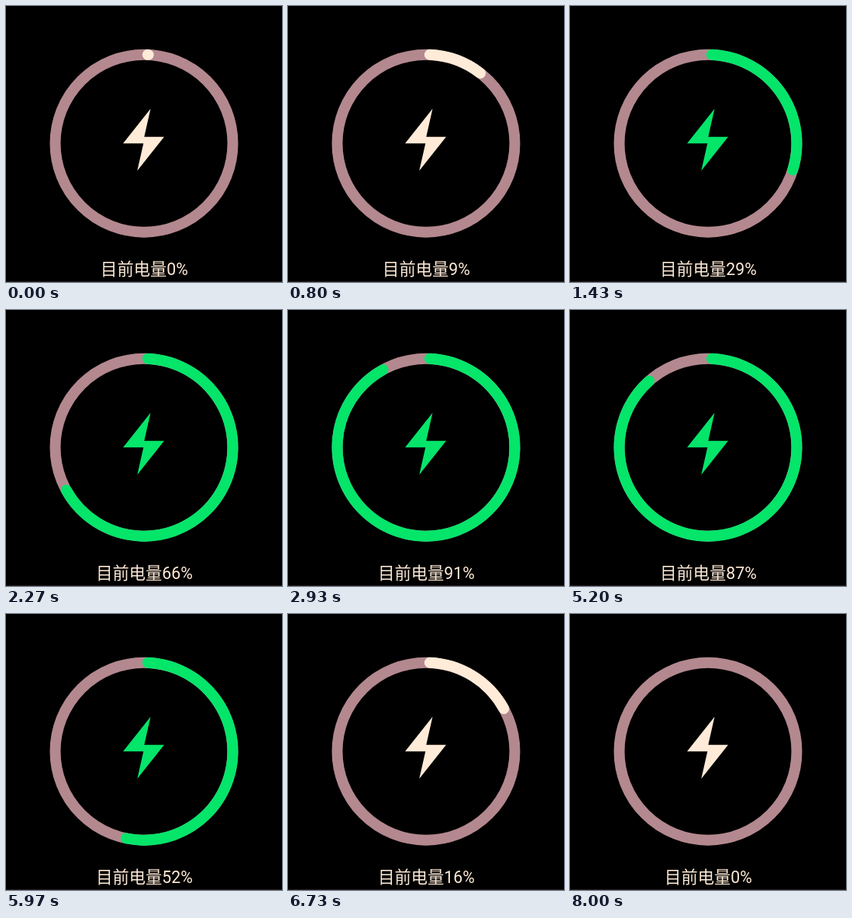
Recreate the animation shown at these times as an HTML page. Size 356 px wide and 356 px high, loop 8560 ms.

```html
<!DOCTYPE html>
<html lang="zh-CN">
<head>
<meta charset="utf-8">
<title>电量</title>
<style>
  html, body {
    margin: 0;
    width: 100%;
    height: 100%;
    overflow: hidden;
    background: #000;
  }
  svg {
    display: block;
    width: 100%;
    height: 100%;
    color: #ffebd7;
  }
  svg.charged { color: #04e56a; }
  circle { fill: none; stroke-width: 13.9; }
  .track { stroke: #b4888f; }
  .level { stroke: currentColor; stroke-linecap: round; }
  .bolt { fill: currentColor; }
  .edge { fill: #241c1c; }
  text {
    font: 400 21.3px Roboto, "Noto Sans CJK SC", "Noto Sans CJK", sans-serif;
    fill: #ffebd7;
    text-anchor: middle;
  }
</style>
</head>
<body>
<svg id="stage" viewBox="0 0 356 356">
  <rect class="edge" y="355" width="356" height="1"/>
  <circle class="track" cx="178" cy="177.2" r="114.5"/>
  <circle class="level" id="level" cx="178" cy="177.2" r="114.5" pathLength="100"
          transform="rotate(-87.6 178 177.2)"/>
  <path class="bolt" d="M186.5 132.5 151 177.3H177.3L169.3 212.4 204 168.7H178.3Z"/>
  <text id="label" x="178.5" y="346.5">目前电量0%</text>
</svg>
<script>
  const LOOP = 8560;
  const LOW = 20;
  const stage = document.getElementById('stage');
  const level = document.getElementById('level');
  const label = document.getElementById('label');

  // Ease with control points (x1, 0) and (x2, 1)
  function ease(x, x1, x2) {
    if (x <= 0) return 0;
    if (x >= 1) return 1;
    let lo = 0, hi = 1, s;
    for (let i = 0; i < 30; i++) {
      s = (lo + hi) / 2;
      const r = 1 - s;
      const bx = 3 * s * r * r * x1 + 3 * s * s * r * x2 + s * s * s;
      if (bx < x) lo = s; else hi = s;
    }
    return s * s * (3 - 2 * s);
  }

  function charge(t) {
    return t < 4000
      ? 100 * ease((t + 107) / 3670, 0.476, 0.661)
      : 100 * (1 - ease((t - 4507) / 3050, 0.37, 0.62));
  }

  function draw(t) {
    const v = charge(t);
    stage.classList.toggle('charged', v >= LOW);
    level.style.visibility = v > 0 ? 'visible' : 'hidden';
    level.setAttribute('stroke-dasharray', v.toFixed(3) + ' 200');
    const text = '目前电量' + Math.floor(v) + '%';
    if (label.textContent !== text) label.textContent = text;
  }

  const start = performance.now();
  function tick() {
    draw((performance.now() - start) % LOOP);
    requestAnimationFrame(tick);
  }
  tick();
</script>
</body>
</html>
```
